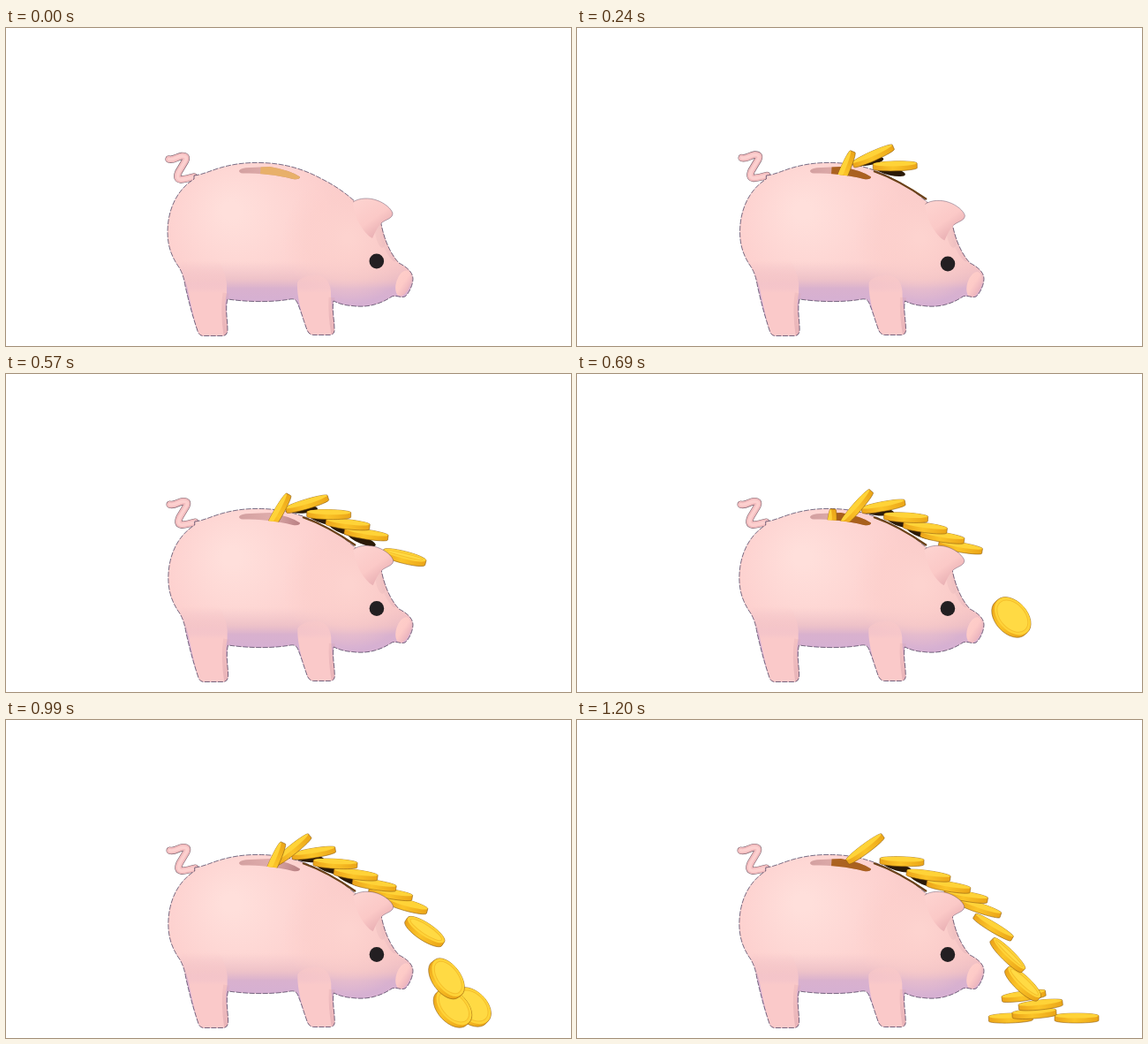
These frames come from a looping animation (640 px wide and 360 px high, 1230 ms). An HTML page with a canvas:

```html
<!DOCTYPE html>
<html lang="en">
<head>
<meta charset="utf-8">
<title>Piggy bank</title>
<style>
  html, body { margin: 0; width: 100%; height: 100%; overflow: hidden; background: #fff; }
  canvas { display: block; width: 640px; height: 360px; }
</style>
</head>
<body>
<canvas id="stage" width="640" height="360"></canvas>
<script>
const ctx = document.getElementById('stage').getContext('2d');
const LOOP = 1230, STEP = 30, COINS = 14;
const RADIUS = 25, THIN = 5.5;            // coin radius, half height when seen edge-on
const POP = 130;                          // time a coin needs to climb out of the slot
const CREST = { x: 333, y: 144 }, EAR = { x: 446, y: 203 };
const DRIFT = .34, SPEED = .28, GRAVITY = .0019;

const lerp = (a, b, k) => a + (b - a) * k;
const clamp = k => Math.min(1, Math.max(0, k));

// Coins leave in two waves; the later ones slide faster.
const coins = Array.from({ length: COINS }, (_, i) => {
  const bottom = 343 - 10 * Math.max(0, i - 1.5);
  const tumble = Math.max(0, 1 - i / 7);
  const drop = bottom - THIN - 14 * tumble - EAR.y;
  return {
    crest: 190 + 83 * i - 50 * Math.cos(2 * Math.PI * i / 13),
    ear: 555 + 188 * i ** .57,
    land: (Math.sqrt(SPEED ** 2 + 4 * GRAVITY * drop) - SPEED) / (2 * GRAVITY),
    settle: 450 / (1 + 3 * i),
    restX: 516 + 50 * Math.cos(2.4 * i) * Math.exp(-.4 * i),
    restTilt: -2 * i,
    bottom, tumble
  };
});

function emerge(k) {
  return { x: CREST.x - 45 * k, y: CREST.y + 34 * k ** 1.5, h: THIN, tilt: -28 - 58 * k };
}

function slide(u) {
  return {
    x: lerp(CREST.x, EAR.x, u), y: lerp(CREST.y, EAR.y, u ** 1.1),
    h: THIN, tilt: 10 - 38 * Math.exp(-5 * u), onBack: u < .7
  };
}

function fall(c, age) {
  return {
    x: EAR.x + DRIFT * age,
    y: EAR.y + SPEED * age + GRAVITY * age * age,
    h: THIN + 19 * c.tumble * Math.min(1, age / 200),
    tilt: 10 + .28 * age
  };
}

function settle(c, age) {
  const from = fall(c, c.land), k = clamp((age - c.land) / c.settle) ** 2;
  const h = lerp(from.h, THIN, k);
  const y = lerp(from.y, c.bottom - h, clamp((age - c.land) / 60));
  return { x: lerp(from.x, c.restX, k), y, h, tilt: lerp(from.tilt, c.restTilt, k) };
}

function poseAt(c, t) {
  if (t < c.crest - POP) return null;
  if (t < c.crest) return emerge((c.crest - t) / POP);
  if (t < c.ear) return slide((t - c.crest) / (c.ear - c.crest));
  const age = t - c.ear;
  return age < c.land ? fall(c, age) : settle(c, age);
}

const body = new Path2D(`M213 167 C222 166 228 163 240 159 C256 154 272 152 289 152.500
  C314 153 336 159 358 171 C374 179 386 188 396 197 L424 216 C427 236 434 254 445 266
  C455 271 461 277 461 284 C461 290 457 300 452 304 C447 306 443 302 437 304
  C424 313 408 317 392 314.500 C382 314 375 311 371 309 C369 320 372 330 372 340
  Q373 347 367 347.500 H348 Q343 347 341 342 C337 331 334 320 330 311 Q328 306 322 307
  C300 311 272 310 251 307 C248 318 251 330 251 341 Q251 348 246 348.500 H224
  Q219 349 217 343 C211 325 207 310 203 292 Q201 279 196 271 C186 257 183 244 183 231
  C183 208 192 184 213 171 Z`);
const legs = new Path2D(`M197 262 C205 285 211 325 217 343 Q219 349 224 348.500 H246 Q251 348 251 341
  C251 328 246 318 250 300 Q252 280 240 262 Z
  M330 288 C329 305 337 330 341 342 Q343 347 348 347.500 H367 Q373 347 372 340
  C371 325 368 315 368 298 Q366 280 350 280 Q335 280 330 288 Z`);
const calves = new Path2D('M249 300 Q246 320 250 348 M369 305 Q368 325 372 347');
const earRim = 'M393 197 C400 192 412 192 420 195 C429 198 437 205 438 210 C438 216 429 217 425 221';
const ear = new Path2D(earRim + ' C420 226 418 232 415 238 C404 232 394 213 393 197 Z');
const tail = new Path2D(`M184.500 148.500 C190 150 194 145.500 199 145 Q206 144.500 203 150.500
  L195.500 163 Q192 171 198 171.500 Q204 171 213 168.500`);
const slot = new Path2D(`M264 161.500 Q266 158 276 158 L299 157 Q322 161 333 168.500
  Q333 172 325 171 C306 166 288 164.500 268 164.500 Q264 164 264 161.500 Z`);
const back = new Path2D('M336 162 C356 169 376 180 396 194');
const inFront = new Path2D('M0 0 H640 V360 H333 V171 L325 171 C306 166 288 165 264 164.500 H0 Z');

function gradient(box, ...stops) {
  const g = box.length === 4 ? ctx.createLinearGradient(...box) : ctx.createRadialGradient(...box);
  stops.forEach(([at, color]) => g.addColorStop(at, color));
  return g;
}
function fill(path, style) { ctx.fillStyle = style; ctx.fill(path); }
function stroke(path, style, width) {
  ctx.strokeStyle = style;
  ctx.lineWidth = width;
  ctx.stroke(path);
}
function oval(x, y, rx, ry, turn, style) {
  const p = new Path2D();
  p.ellipse(x, y, rx, ry, turn, 0, 7);
  fill(p, style);
  return p;
}
function within(path, draw) {
  ctx.save();
  ctx.clip(path);
  draw();
  ctx.restore();
}
function placed(x, y, tilt, draw) {
  ctx.save();
  ctx.translate(x, y);
  ctx.rotate(tilt * Math.PI / 180);
  draw();
  ctx.restore();
}

const tones = {
  skin: gradient([255, 207, 10, 280, 225, 150], [0, '#ffdfdb'], [.55, '#fdd1cf'], [1, '#f6c4c5']),
  under: gradient([0, 264, 0, 308], [0, '#eabcc400'], [.45, '#e6b9c4a0'], [.7, '#d9b1ce'], [1, '#d6b0d2']),
  leg: gradient([0, 262, 0, 300], [0, '#fac9c900'], [1, '#fac9c9']),
  calf: gradient([0, 270, 0, 345], [0, '#d79fa800'], [1, '#d79fa880']),
  head: gradient([388, 238, 5, 388, 238, 75], [0, '#fdd3cf'], [.6, '#fccfcb90'], [1, '#fccfcb00']),
  ear: gradient([398, 196, 424, 232], [0, '#fdd2cf'], [.6, '#fbc9c7'], [1, '#e9b0b4']),
  snout: gradient([440, 275, 462, 290], [0, '#ffd0ca'], [.6, '#fdcac7'], [1, '#e9b1bd']),
  slot: gradient([264, 158, 333, 170], [0, '#d3a0a0'], [.5, '#dfacab'], [1, '#b98083']),
  rim: gradient([-RADIUS, 0, RADIUS, 0], [0, '#eca41a'], [.45, '#fbc428'], [1, '#eba518'])
};

function drawTail() {
  ctx.lineCap = ctx.lineJoin = 'round';
  stroke(tail, '#7f6672', 8.4);
  stroke(tail, '#f3bdbf', 7.2);
  stroke(tail, '#fcd0cf', 3.5);
}

function drawBody(dy) {
  fill(body, tones.skin);
  within(body, () => {
    fill(body, tones.under);
    oval(424, 231, 6, 18, -.15, '#c9969f80');
    oval(433, 247, 5, 19, -.45, '#d2a0ae70');
    fill(body, tones.head);
    fill(legs, tones.leg);
    stroke(calves, tones.calf, 7);
    oval(450, 289 + dy / 2, 8, 15, .3, tones.snout);
  });
  ctx.setLineDash([6, 1.5]);
  stroke(body, '#3c3154b0', 1);
  ctx.setLineDash([]);
  oval(419.8, 264 + dy, 8.3, 8.5, 0, '#231f22');
}

function drawSlot(t) {
  fill(slot, tones.slot);
  within(slot, () => {
    ctx.globalAlpha = t < 120 ? 1 : clamp(Math.cos((t - 220) / 480 * 2 * Math.PI));
    fill(new Path2D('M289 150 H345 V176 L288 166 Z'), t < 120 ? '#e8b06a' : '#a9601c');
    ctx.globalAlpha = 1;
  });
}

function drawShadow(p) {
  if (p.onBack) placed(p.x - 5, p.y + 6, p.tilt + 14, () => oval(0, 0, 17, 4.5, 0, '#2b1a07'));
}

function drawCoin({ x, y, h, tilt }) {
  const thick = 5.5 * Math.sqrt(Math.max(0, 1 - (h / 26) ** 2));
  const d = thick / 2, ry = h - d;
  placed(x, y, tilt, () => {
    const rim = new Path2D();
    rim.ellipse(0, -d, RADIUS, ry, 0, Math.PI, 0);
    rim.ellipse(0, d, RADIUS, ry, 0, 0, Math.PI);
    rim.closePath();
    fill(rim, tones.rim);
    stroke(rim, '#8a5a10b0', .8);
    oval(0, -d, RADIUS - .4, ry, 0, '#ffd338');
    if (ry > 4) stroke(oval(0, -d, RADIUS - 4, ry - 2.5, 0, '#ffda44'), '#f5c02c', 1);
  });
}

function drawEar() {
  fill(ear, tones.ear);
  stroke(new Path2D(earRim), '#5b466090', .8);
}

function render(t) {
  // The pig dips as the first coins burst out, then rests slightly lower.
  const dy = 1.6 * (1 - Math.exp(-t / 60)) + 1.4 * Math.exp(-(((t - 240) / 110) ** 2));
  const dx = dy / 2.2;
  ctx.clearRect(0, 0, 640, 360);
  placed(dx * 1.6, -dy / 2, 0, drawTail);
  ctx.save();
  ctx.translate(461, 0);
  ctx.scale(1 - dx * .004, 1);
  ctx.translate(-461, 0);
  drawBody(dy);
  ctx.restore();
  drawSlot(t);
  if (t > 200) stroke(back, '#6b4118', 2.2);
  const poses = coins.map(c => poseAt(c, t)).filter(Boolean);
  within(inFront, () => {
    poses.forEach(drawShadow);
    poses.forEach(drawCoin);
  });
  placed(dx, dy * .8, 0, drawEar);
}

const start = performance.now();
function tick() {
  const t = (performance.now() - start) % LOOP;
  render(Math.floor(t / STEP) * STEP);
  requestAnimationFrame(tick);
}
tick();
</script>
</body>
</html>
```
